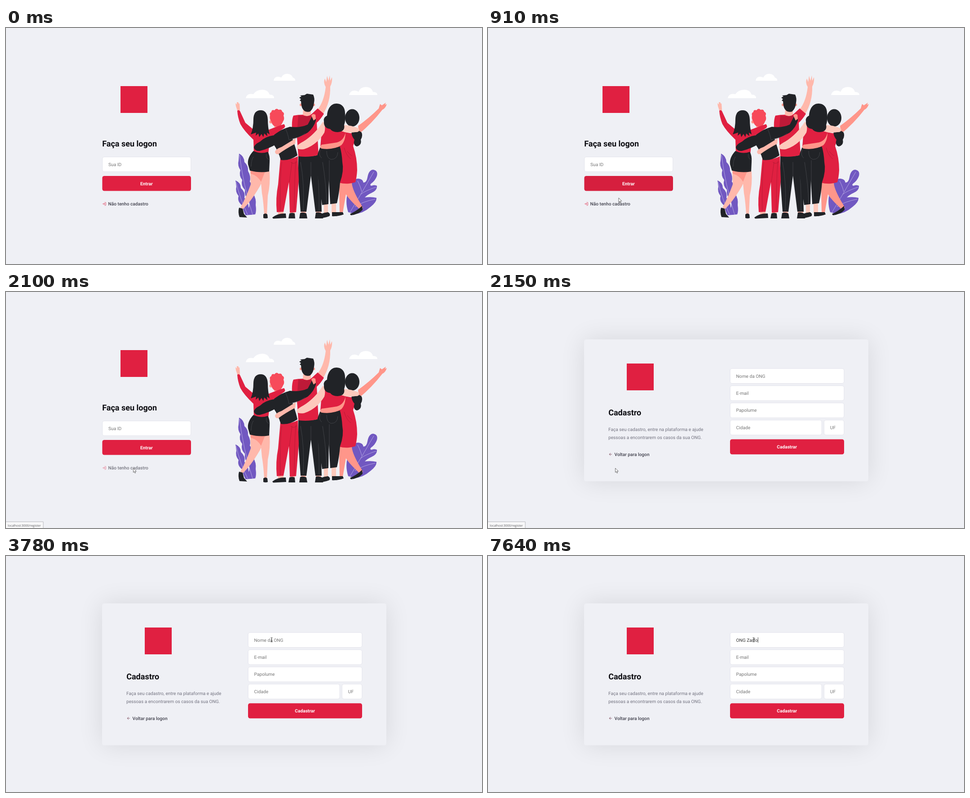
These frames come from a looping animation (1060 by 528 pixels, 8 s). An HTML page:

```html
<!DOCTYPE html>
<html lang="pt-BR">
<head>
<meta charset="utf-8">
<title>Cadastro</title>
<style>
html, body { margin: 0; width: 100%; height: 100%; overflow: hidden; background: #eff0f5; }
svg { display: block; width: 1060px; height: 528px; }
text { font: 400 10.17px Roboto, sans-serif; text-rendering: geometricPrecision; white-space: pre; }
.title { font-size: 18px; font-weight: 700; fill: #0c0c11; }
.link text { font-weight: 500; fill: #41414d; }
.para text { fill: #737380; }
.hint { fill: #757575; }
.field rect { fill: #fff; stroke: #dcdce6; stroke-width: .7; rx: 4.5px; }
.label { font-weight: 700; fill: #fff; text-anchor: middle; }
.btn { fill: #e02041; rx: 4.5px; }
.icon { fill: none; stroke: #e02041; stroke-width: 2; stroke-linecap: round; stroke-linejoin: round; }
.k { fill: #212327; }
.r { fill: #e02041; }
.d { fill: #bd1a38; }
.s { fill: #ffb8ab; }
.p { fill: #ff968a; }
.l { fill: #fdc9bc; }
.v { fill: #7158c1; }
.w { fill: #fff; }
.vein { fill: none; stroke: #cfc6ee; stroke-width: .7; }
.seam { fill: none; stroke: #ab1732; stroke-width: .7; }
.fold { fill: none; stroke: #54565c; stroke-width: .6; }
.status text { font: 6.93px "Open Sans", sans-serif; fill: #5c5c60; }
</style>
</head>
<body>
<svg viewBox="0 0 1060 528">
<defs>
  <filter id="soft" x="-30%" y="-40%" width="160%" height="180%"><feGaussianBlur stdDeviation="28.2"/></filter>
</defs>
<rect width="1060" height="528" fill="#eff0f5"/>

<g id="login">
  <rect class="r" x="255" y="130" width="60" height="60"/>
  <text class="title" x="214.2" y="265.3">Faça seu logon</text>
  <g class="field"><rect x="214.6" y="288.5" width="197.2" height="33"/></g>
  <text class="hint" x="228" y="308.6">Sua ID</text>
  <rect id="enter" class="btn" x="214.4" y="331" width="197.6" height="33.6"/>
  <text class="label" x="312.9" y="351.5">Entrar</text>
  <g id="join" class="link">
    <path class="icon" transform="translate(214.3 389) scale(.377)" d="M15 3h4a2 2 0 0 1 2 2v14a2 2 0 0 1-2 2h-4M10 17l5-5-5-5M15 12H3"/>
    <text x="227.5" y="397.1">Não tenho cadastro</text>
  </g>

  <g id="art">
    <path class="w" d="M596 118Q597 109 606 109Q610 109 613 111Q617 102 627 102.500Q636 103 639 111Q645 113 644 118ZM534 157Q536 145 551 148Q558 138 571 138Q583 138 587 149Q597 149 597 157ZM764 150Q767 139 777 140Q783 141 785 143Q789 132 801 132Q814 132 817 143Q827 143 827 150Z"/>
    <path class="v" d="M519 281Q530 286 531 300Q540 308 539 320Q546 332 543 344Q553 354 550 370Q558 382 556 396Q558 410 555 417L533 419Q546 400 540 385Q530 375 532 362Q522 352 526 340Q518 330 522 318Q515 308 518 296Z"/>
    <path class="v" d="M511 341Q523 346 523 358Q534 368 531 380Q540 390 540 400L547 418H533Q526 404 527 398Q514 388 518 376Q510 366 513 355Z"/>
    <path class="vein" d="M520 284Q528 350 549 417M512 344Q522 385 538 417"/>
    <path class="v" d="M762 412Q752 380 768 352Q774 336 785 337Q795 338 796 346Q803 346 805 334Q808 317 818 317Q829 319 826 331Q822 342 813 348Q809 352 814 353Q820 350 826 353Q827 363 814 369Q805 373 799 379Q814 377 825 380Q826 389 812 400Q795 415 777 416Z"/>
    <path class="vein" d="M819 322L790 372L765 414M824 356Q800 364 790 372M822 383Q795 388 777 400M783 342Q790 356 792 366"/>

    <g>
      <path class="p" d="M784 219Q809 201 830 180L833 170L837 173L846 167L844 172L848 170Q845 180 838 183Q815 213 786 237Z"/>
      <path class="p" d="M742 345H770Q770 358 785 385L795 402L788 406Q765 385 757 372L750 413H743Q742 380 742 345Z"/>
      <path class="k" d="M766 416Q780 410 793 398L794 407Q785 417 768 419ZM731 412H750L752 417Q742 421 730 421Z"/>
      <path class="r" d="M745 230Q770 238 779 234Q778 250 773 264Q782 290 782 318Q781 335 778 345Q760 351 741 346Q750 320 745 300Q738 270 745 230Z"/>
      <path class="seam" d="M753 268Q758 286 768 293M760 276Q766 284 771 286"/>
      <ellipse class="k" cx="771" cy="201" rx="16" ry="19.500"/>
      <path class="k" d="M770 232Q785 226 792 234Q795 242 790 250Q793 262 781 265Q772 262 776 250Q768 240 770 232Z"/>
    </g>

    <g>
      <path class="s" d="M694 182Q708 165 712 132Q706 122 710 113L713 121L715 107L718 118L721 106L722 118L726 110Q727 122 722 131Q723 165 706 193Z"/>
      <path class="s" d="M657 405H668V417H657ZM690 405H702V417H690Z"/>
      <path class="k" d="M651 284Q675 290 696 284L701 340L703 411H689L679 330L669 411H656L651 340Z"/>
      <path class="k" d="M655 414Q662 411 669 415L671 426H653ZM690 413Q698 411 704 415L706 426H688Z"/>
      <path class="fold" d="M656 300Q665 350 662 408M679 300V330M692 300Q698 350 697 408"/>
      <path class="r" d="M640 196Q650 194 661 194Q671 200 681 192L694 180L708 192Q700 205 692 212L696 284Q675 290 651 287L648 245L637 225Q636 205 640 196Z"/>
      <path class="d" d="M651 195Q671 200 686 194L690 208L665 222L649 222Z"/>
      <path class="seam" d="M683 193L695 207"/>
      <path class="s" d="M662 182H679V194Q671 200 661 194Z"/>
      <circle class="p" cx="657" cy="172" r="3"/><circle class="p" cx="685" cy="172" r="3"/>
      <path class="k" d="M657 164L654 162L657 159L653 156L658 153L655 151L665 150L670 147L684 149Q688 157 686 167Q685 180 677 187Q671 189 665 186Q657 180 657 164Z"/>
    </g>

    <g>
      <path class="s" d="M606 408H618V417H606ZM632 408H643V417H632Z"/>
      <path class="r" d="M611 292Q630 297 650 287L652 340L646 412L632 413L630 345L618 411L603 412Q600 380 606 350Z"/>
      <path class="seam" d="M614 300Q609 350 611 410M631 345L637 300M645 298Q642 350 642 410M634 300Q641 306 648 299"/>
      <path class="k" d="M593 424Q605 414 623 415L624 425L595 426.500ZM631 415Q637 412 643 415L644 426H629Z"/>
      <path class="k" d="M597 237Q615 226 632 221Q655 224 672 216L683 195Q690 198 690 207Q686 222 672 234Q655 244 638 248Q646 270 649 285Q630 298 612 295Q606 275 597 262Z"/>
      <path class="p" d="M680 196Q683 190 689 194L690 203L685 207Z"/>
      <path class="fold" d="M622 224Q629 240 630 250Q650 248 666 236"/>
      <path class="s" d="M645 247Q630 256 614 266Q600 271 599 277Q600 284 607 282Q620 272 644 259Z"/>
      <path class="p" d="M595 208H613V222Q603 225 597 221Z"/>
      <circle class="p" cx="590" cy="210" r="3.500"/>
      <path fill="#f74a5a" d="M588 196Q586 190 591 188Q591 182 598 184Q602 178 607 183Q614 181 615 187Q621 190 618 196Q621 204 617 209Q613 220 604 221Q594 221 591 210Q586 202 588 196Z"/>
    </g>

    <g>
      <path class="s" d="M516 187L512 175L511 168L514 171L514 166L517 166L519 170L520 168L521 184Z"/>
      <path class="s" d="M544 318L577 321Q572 345 560 363Q545 388 528 405L522 402Q535 378 545 350Z"/>
      <path class="s" d="M567 321H587Q589 350 583 375L581 418H575Q573 385 570 370Q567 345 567 321Z"/>
      <path class="p" d="M545 319L577 321L568 344Q560 330 545 326Z"/>
      <path class="k" d="M519 402L527 404L530 416L537 424L520 423Q516 412 519 402ZM573 417Q578 413 582 417L583 425Q578 427 573 425Z"/>
      <path class="r" d="M515 185Q520 182 522 188L533 212L552 228H584Q604 220 619 215Q625 221 616 226Q602 235 588 246L584 282H552L551 250Q530 230 522 215Q516 200 515 185Z"/>
      <path class="k" d="M551 275Q537 290 539 305L543 319Q566 325 586 321L587 300Q588 285 583 277Q568 283 551 275Z"/>
      <path class="fold" d="M580 282Q578 292 586 294M546 310Q546 295 551 288"/>
      <path class="k" d="M622 225Q608 231 596 240Q577 243 566 254Q552 261 552 268Q555 276 565 275Q586 270 605 258Z"/>
      <path class="k" d="M551 203Q552 184 567 184Q582 184 583 205Q583 222 587 238L581 234L582 242L575 236L573 244L569 237L564 244L562 236L556 241L557 234L545 238Q551 225 551 203Z"/>
    </g>

    <g>
      <path class="l" d="M708 393H717V414H708ZM725 391H735V414H725Z"/>
      <path class="k" d="M701 264Q689 290 691 310L704 396L718 394L719 340L722 394L737 392Q742 370 744 345Q753 320 749 300Q748 280 743 263Z"/>
      <path class="fold" d="M700 272Q695 284 703 291M714 275Q714 292 724 294Q738 294 739 278M720 296V342M705 300Q713 350 714 392"/>
      <path class="k" d="M690 425Q698 414 717 412Q724 416 720 421Q708 426 690 426ZM726 412H738L742 419Q734 422 726 421Z"/>
      <path class="r" d="M704 215Q725 230 754 224Q753 245 748 264Q725 271 700 266Z"/>
      <path class="p" d="M756 234Q752 252 737 256Q718 259 703 261Q696 268 704 270Q730 273 747 262Q756 252 756 234Z"/>
      <path class="l" d="M706 209Q688 238 662 254Q648 261 647 267Q650 273 664 271Q692 262 709 234Q713 220 706 209Z"/>
      <path class="l" d="M748 217Q770 217 786 225Q788 234 778 233Q760 236 744 230Z"/>
      <path class="k" d="M736 169C748 169 755 178 755 190Q757 205 753 217Q756 232 738 233Q727 233 722 226Q707 224 708 209Q706 200 715 196C716 180 724 169 736 169Z"/>
    </g>
  </g>
</g>

<g id="register">
  <rect x="214" y="106" width="633" height="317.500" rx="4.500" fill="#000" opacity=".1" filter="url(#soft)"/>
  <rect x="214" y="106" width="633" height="317.500" rx="4.500" fill="#eff0f5"/>
  <rect class="r" x="309" y="160" width="60" height="60"/>
  <text class="title" x="268.200" y="275.700">Cadastro</text>
  <g class="para">
    <text x="268" y="310.700">Faça seu cadastro, entre na plataforma e ajude</text>
    <text x="268" y="328.800">pessoas a encontrarem os casos da sua ONG.</text>
  </g>
  <g class="link">
    <path class="icon" style="stroke:#6b3043" transform="translate(268.300 358.600) scale(.377)" d="M19 12H5M12 19l-7-7 7-7"/>
    <text x="281.600" y="366.700">Voltar para logon</text>
  </g>
  <g class="field">
    <rect x="539.200" y="171.200" width="253.700" height="33.300"/>
    <rect x="539.200" y="209.700" width="253.700" height="33.300"/>
    <rect x="539.200" y="248.200" width="253.700" height="33.300"/>
    <rect x="539.200" y="286.600" width="204" height="33.300"/>
    <rect x="748.300" y="286.600" width="44.600" height="33.300"/>
  </g>
  <text id="hint" class="hint" x="552.600" y="191.600">Nome da ONG</text>
  <text class="hint" x="552.600" y="230">E-mail</text>
  <text class="hint" x="552.600" y="268.400">Papolume</text>
  <text class="hint" x="552.600" y="306.900">Cidade</text>
  <text class="hint" x="761.800" y="306.900">UF</text>
  <rect class="btn" x="539" y="329.400" width="254" height="33.800"/>
  <text class="label" x="665.700" y="349.700">Cadastrar</text>
  <text id="name" x="552.600" y="191.600" fill="#333"></text>
  <rect id="caret" y="182" width=".8" height="12" fill="#222"/>
</g>

<g id="status" class="status">
  <path d="M-1 514H83V529H-1Z" fill="#f8f8f9" stroke="#b5b5ba"/>
  <text x="4" y="525">localhost:3000/register</text>
</g>

<g id="pointer">
  <circle id="click" r="7" fill="#ff0" opacity=".47"/>
  <path id="arrow" d="M0 0V9.600L2.200 7.600L3.600 11.200L5.200 10.500L3.700 7.100H6.800Z" fill="#fff" stroke="#333" stroke-width=".7"/>
  <path id="hand" d="M-1 1Q0 -.6 1.100 1V5.500Q2.500 4.800 3.200 6Q4.800 5.400 5.200 6.600Q6.800 6.200 6.800 8V10.500L5.400 13.500H-.5L-3.800 8.800Q-4 7 -2.400 7.600L-1 9Z" fill="#fff" stroke="#333" stroke-width=".8"/>
  <path id="beam" d="M-2.200 -4.500H2.200M0 -4.500V4.500M-2.200 4.500H2.200" fill="none" stroke="#333" stroke-width=".9"/>
</g>
</svg>

<script>
const LOOP = 8000;
const $ = id => document.getElementById(id);
const show = (id, on) => $(id).style.display = on ? '' : 'none';
const within = (t, a, b) => t >= a && t < b;

// Each key is [time, value, ...]; values run linearly between keys.
const path = [
  [170, 570, 0], [480, 440, 170], [780, 318, 338], [910, 291, 380], [970, 290, 384],
  [1000, 289, 386], [1300, 283.5, 394], [2400, 283.5, 394], [2600, 355, 388], [2840, 460, 361],
  [3020, 525, 310], [3180, 554, 273.5], [3480, 576, 225], [3780, 591.5, 187.5]
];
const dim = [[700, 1], [850, .9], [910, .955], [1020, 1]];
const fade = [[1000, 1], [1200, .7]];
const bar = [[1000, 0], [1250, 1], [2400, 1], [2840, .12], [3000, 0]];

const text = 'ONG Zarfo';
const keys = [5670, 6040, 6180, 6740, 7050, 7180, 7390, 7610, 7640];
const blinks = [[4490, 4970], [5510, 5670], [6690, 6740]];

function at(track, t) {
  const i = track.findIndex(k => k[0] > t);
  if (i < 0) return track[track.length - 1].slice(1);
  if (i === 0) return track[0].slice(1);
  const a = track[i - 1], b = track[i], u = (t - a[0]) / (b[0] - a[0]);
  return a.slice(1).map((v, n) => v + (b[n + 1] - v) * u);
}

function draw(t) {
  show('login', t < 2150);
  show('register', t >= 2150);
  $('enter').style.filter = `brightness(${at(dim, t)[0]})`;
  $('join').style.opacity = at(fade, t)[0];
  $('status').style.opacity = at(bar, t)[0];

  const [x, y] = at(path, t);
  $('pointer').setAttribute('transform', `translate(${x} ${y})`);
  show('pointer', t >= 170);
  show('arrow', t < 2260);
  show('hand', within(t, 2260, 3120));
  show('beam', t >= 3120);
  show('click', within(t, 1920, 2070) || within(t, 3940, 4020));

  const typed = text.slice(0, keys.filter(k => k <= t).length);
  const name = $('name');
  if (name.textContent !== typed) name.textContent = typed;
  show('hint', !typed);
  show('caret', t >= 3940 && !blinks.some(([a, b]) => within(t, a, b)));
  if (t >= 3940) $('caret').setAttribute('x', 552.7 + (typed ? name.getComputedTextLength() : 0));
}

const start = performance.now();
function tick() {
  draw((performance.now() - start) % LOOP);
  requestAnimationFrame(tick);
}
tick();
</script>
</body>
</html>
```
